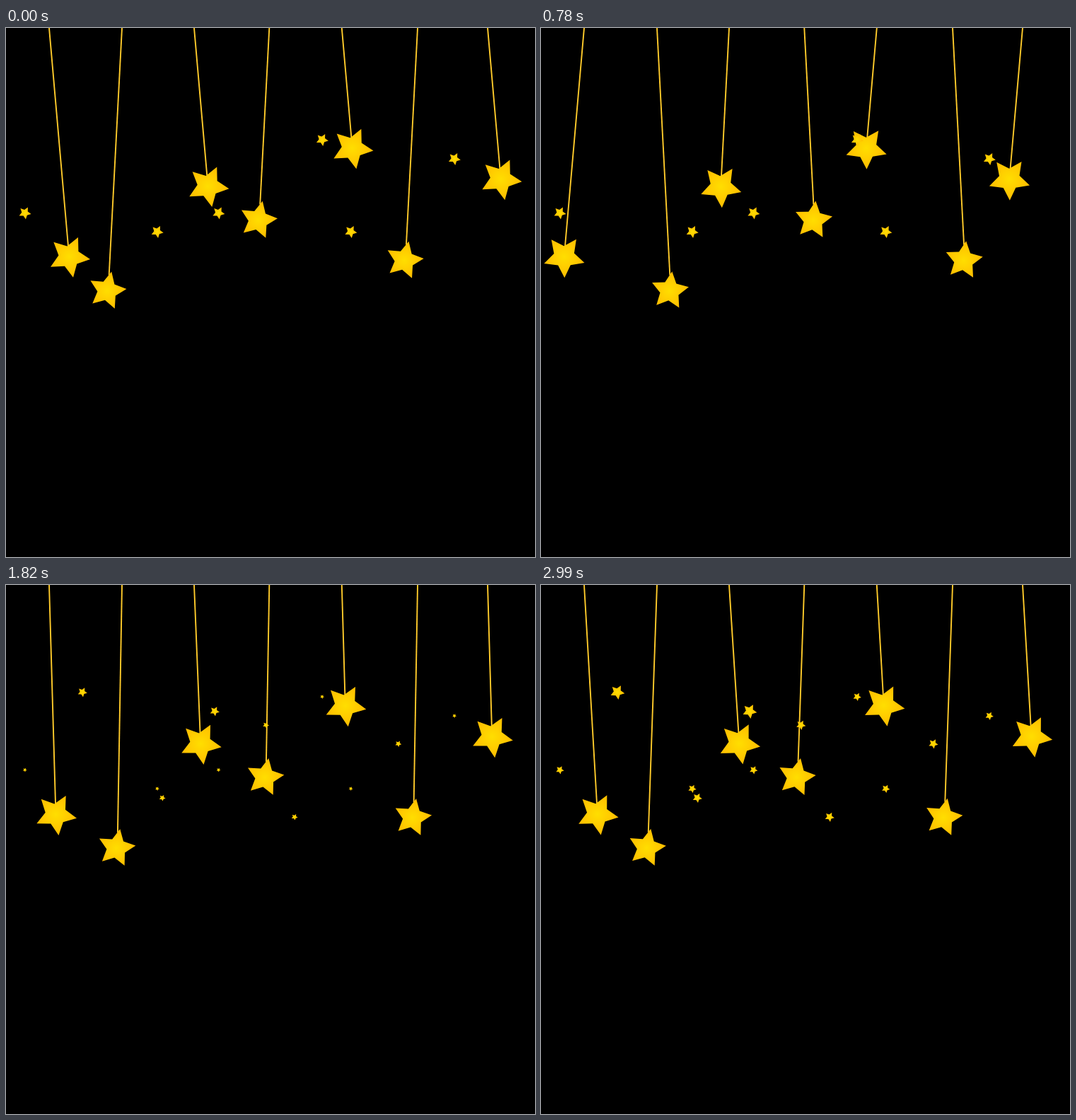
These frames come from a looping animation (748x748 px, 3.12 s). An HTML page with a canvas:

```html
<!DOCTYPE html>
<html lang="en">
<head>
<meta charset="utf-8">
<title>Hanging stars</title>
<style>
  html, body { margin: 0; height: 100%; overflow: hidden; background: #000; }
  canvas { display: block; }
</style>
</head>
<body>
<canvas id="stage" width="748" height="748"></canvas>
<script>
const ctx = document.getElementById('stage').getContext('2d');
const STEP = 130, SWING = 12, TWINKLE = 6;
const rad = deg => deg * Math.PI / 180;

// pivot x, string length, swing angle at the start and at the turn
const pendulums = [
  { x: 61, length: 324.5, from: 5, to: -5, inverted: true },
  { x: 164, length: 372, from: -3, to: 3 },
  { x: 266, length: 224.5, from: 5, to: -3, inverted: true },
  { x: 372.3, length: 272, from: -3, to: 3 },
  { x: 474.8, length: 170.5, from: 5, to: -5, inverted: true },
  { x: 582, length: 329, from: -3, to: 3 },
  { x: 681, length: 214.5, from: 5, to: -5, inverted: true },
];
const sparks = [[26.7, 261.5], [300.5, 261.5], [447, 158], [634, 185], [213.8, 288], [487.5, 288]];
const glints = [[108, 151.5, 10.5], [295, 178.5, 10.5], [367.5, 198, 7],
                [554.7, 224.5, 7], [221, 301, 7], [408, 328, 7]];

function star(x, y, radius, tilt) {
  if (radius <= 0) return;
  ctx.save();
  ctx.translate(x, y);
  ctx.rotate(rad(tilt));
  const glow = ctx.createRadialGradient(0, 0, 0, 0, 0, radius);
  glow.addColorStop(0, '#ffde00');
  glow.addColorStop(1, '#ffbc00');
  ctx.fillStyle = glow;
  ctx.beginPath();
  for (let i = 0; i < 10; i++) {
    const r = i % 2 ? radius / 2 : radius, a = i * Math.PI / 5;
    ctx.lineTo(r * Math.sin(a), -r * Math.cos(a));
  }
  ctx.fill();
  ctx.restore();
}

function pendulum({ x, length, from, to, inverted }, progress) {
  const angle = from + (to - from) * progress;
  ctx.save();
  ctx.translate(x, 0);
  ctx.rotate(rad(-angle));
  ctx.beginPath();
  ctx.moveTo(0, -5);
  ctx.lineTo(0, length - (inverted ? 15 : 22));
  ctx.stroke();
  if (inverted) star(0, length, 30, 174);
  else star(-1.5, length, 27.5, 10);
  ctx.restore();
}

function draw(now) {
  const step = Math.floor(now / STEP);
  const swing = step % SWING, beat = step % TWINKLE;
  const half = SWING / 2;
  const progress = 1 - Math.abs(half - swing) / half;
  const size = Math.abs(TWINKLE / 2 - beat) / (TWINKLE / 2);

  ctx.clearRect(0, 0, 748, 748);
  ctx.strokeStyle = '#ffcb2b';
  ctx.lineWidth = 1.9;
  for (const p of pendulums) pendulum(p, progress);
  for (const [x, y] of sparks) star(x, y, 9 * size, 172);
  if (beat) for (const [x, y, r] of glints) star(x, y, r * (size + 1 / 3), 172);
  requestAnimationFrame(draw);
}
requestAnimationFrame(draw);
</script>
</body>
</html>
```
